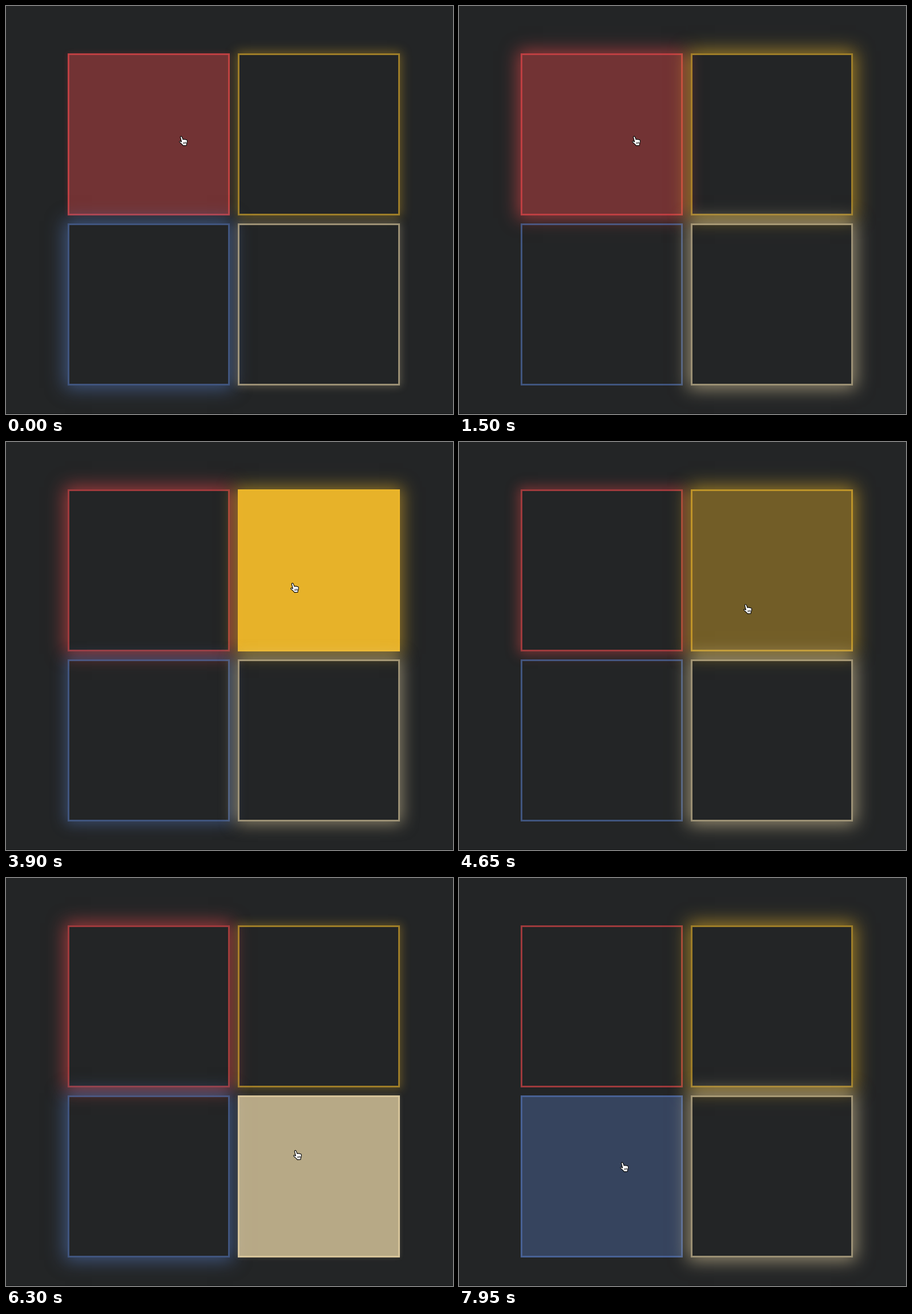
Write an HTML page that moves like this. It is 783 px wide and 715 px high and loops after 8 s.

```html
<!DOCTYPE html>
<html lang="en">
<head>
<meta charset="utf-8">
<title>Glowing squares</title>
<style>
  html, body { margin: 0; width: 100%; height: 100%; overflow: hidden; background: #232526; }
  body { position: relative; }
  body::after { content: ""; position: absolute; left: 0; right: 0; bottom: 0; height: 1px; background: #161819; }
  .box { position: absolute; box-sizing: border-box; width: 284px; height: 284px; border: 3px solid; }
  #hand { position: absolute; left: 0; top: 0; z-index: 1; overflow: visible; transform-origin: 0 0; }
</style>
</head>
<body>
<svg id="hand" width="16" height="18">
  <path fill="#fff" stroke="#000" stroke-linejoin="round" d="M3 2.5C3.5.8 5.3 1 5.8 2.4L7.4 6.6C8 5.6 9.4 5.7 9.8 6.6C10.5 5.9 11.7 6.1 12 7C12.9 6.6 14 7 14.1 8.2C14.2 10.5 14 11.7 13 13.3L12.8 15.8L7.4 16C6.8 14.6 4.2 12.6 2.3 11C1.2 10 1.6 8.6 3 9L5 10Z"/>
  <path fill="none" stroke="#000" stroke-width=".8" d="M8.2 10.5v3M10 10.3v3M11.8 10v3"/>
</svg>
<script>
const LOOP = 8000, STEP = 150;
const HOVER = .385, FADE = 500, HOLD = 200, MOVE = 350;

// start: a moment when the glow is weakest; low: its weakest level
const boxes = [
  { rgb: "240,73,75", start: -180, period: 2700, low: 0, enter: -FADE, leave: 2250, presses: [750, 1650] },
  { rgb: "238,183,42", start: -225, period: 3225, low: .45, enter: 2250, leave: 4700, presses: [3750] },
  { rgb: "84,118,185", start: 1500, period: 3225, low: 0, enter: 7450, leave: LOOP, presses: [] },
  { rgb: "235,215,168", start: -400, period: 3250, low: 0, enter: 4700, leave: 7450, presses: [6000, 6500] }
];

// Pointer stops: time the move begins, x, y
const stops = [[-MOVE, 302, 227], [2100, 497, 246], [4550, 498, 444], [5600, 502, 476], [7350, 281, 497]];

const clamp = x => Math.min(1, Math.max(0, x));
const easeOut = x => 1 - (1 - clamp(x)) ** 2.2;
const smooth = x => (1 - Math.cos(Math.PI * clamp(x))) / 2;

function glowAt({ start, period, low }, t) {
  const phase = ((t - start) / period + 1) % 1;
  return low + (1 - low) * easeOut(1 - Math.abs(2 * phase - 1));
}

function fillAt({ enter, leave, presses }, t) {
  let alpha = HOVER * (easeOut((t - enter) / FADE) - easeOut((t - leave) / FADE));
  for (const p of presses)
    if (t >= p) alpha = Math.max(alpha, .97 - (.97 - HOVER) * easeOut((t - p - HOLD) / FADE));
  // a press never outlives the hover
  return t < leave ? alpha : HOVER * (1 - easeOut((t - leave) / FADE));
}

function pointerAt(t) {
  let [, x, y] = stops[0];
  for (const [begin, nx, ny] of stops) {
    const k = smooth((t - begin) / MOVE);
    x += (nx - x) * k;
    y += (ny - y) * k;
  }
  return [x, y];
}

boxes.forEach((box, i) => {
  const el = box.el = document.createElement("div");
  el.className = "box";
  el.style.left = 108 + i % 2 * 298 + "px";
  el.style.top = 83 + (i >> 1) * 298 + "px";
  el.style.borderColor = `rgba(${box.rgb},.6)`;
  document.body.append(el);
});
const hand = document.getElementById("hand");

function draw(now) {
  const t = Math.floor(now % LOOP / STEP) * STEP;
  for (const box of boxes) {
    const g = glowAt(box, t);
    box.el.style.backgroundColor = `rgba(${box.rgb},${fillAt(box, t)})`;
    box.el.style.boxShadow = `0 0 ${30 * g}px ${5 * g}px rgba(${box.rgb},${.6 * g})`;
  }
  const [x, y] = pointerAt(t);
  hand.style.transform = `translate(${x}px,${y}px) scale(1.1)`;
}

const start = performance.now();
function tick() {
  draw(performance.now() - start);
  requestAnimationFrame(tick);
}
tick();
</script>
</body>
</html>
```
